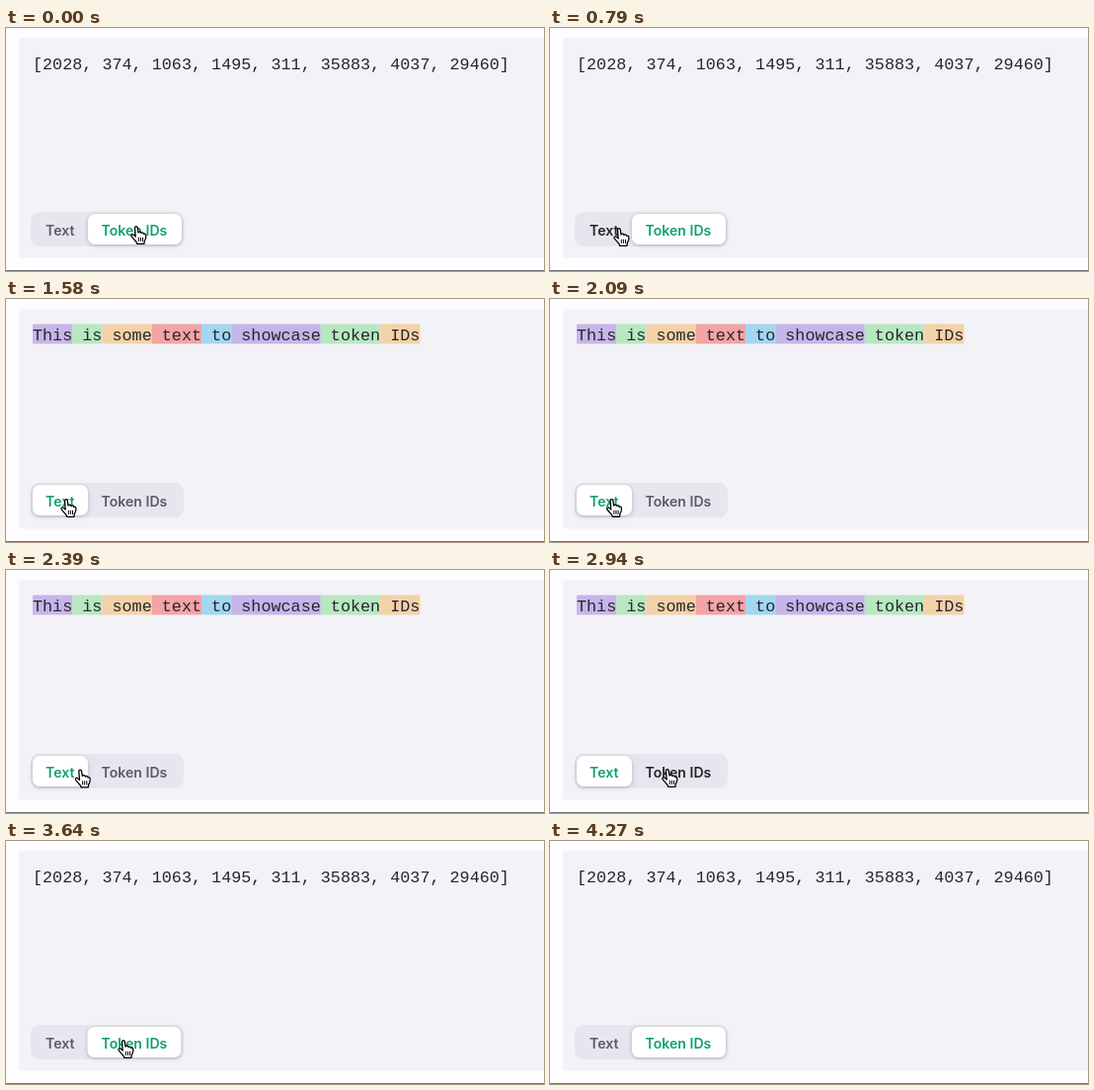
An HTML page that plays this animation: 545x247 px, repeating every 4300 ms.

```html
<!DOCTYPE html>
<html lang="en">
<head>
<meta charset="utf-8">
<style>
html, body { margin: 0; width: 100%; height: 100%; overflow: hidden; background: #fdfcff; }
svg { display: block; }
.mono { font: 16.77px "Liberation Mono", monospace; fill: #26262b; white-space: pre; }
.label { font: 600 14.1px Inter, sans-serif; }
#thumb { fill: #fff; filter: drop-shadow(0 1px 2px #3035504d); }
</style>
</head>
<body>
<svg width="545" height="247" viewBox="0 0 545 247">
  <rect x="13" y="10" width="540" height="223.5" rx="3" fill="#f3f2f6"/>
  <rect y="246" width="545" height="1" fill="#77767a"/>
  <g id="words"></g>
  <text id="ids" class="mono" x="27" y="42">[2028, 374, 1063, 1495, 311, 35883, 4037, 29460]</text>
  <rect x="25" y="187" width="155" height="35" rx="8.5" fill="#e7e6ef"/>
  <rect id="thumb" y="189" height="31" rx="7"/>
  <text id="textTab" class="label" x="40" y="210.5">Text</text>
  <text id="idsTab" class="label" x="96.5" y="210.5">Token IDs</text>
  <g id="hand" fill="#fff" stroke="#000" stroke-width="1.3" stroke-linejoin="round" stroke-linecap="round">
    <path d="M4.5 2.2Q4.5.7 5.8.7Q7.1.7 7.3 2.2L8 7Q8.6 5.9 9.9 6.2Q10.8 6.5 10.9 7.5Q11.6 6.6 12.7 7Q13.5 7.4 13.6 8.4Q14.3 7.8 15.2 8.4Q16 9 15.9 10.5Q15.8 13.5 14.3 15.5L14 18.3H6.8Q6.5 16.8 4.6 14.8L1.2 10.8Q.5 9.6 1.5 9Q2.6 8.6 4 9.8L5.2 11Z"/>
    <path d="M8.3 12.2v3.3M10.4 12.2v3.3M12.5 12.2v3.3" stroke-width="1"/>
  </g>
</svg>
<script>
const $ = id => document.getElementById(id);
const LOOP = 4300, TO_TEXT = 1360, TO_IDS = 3480;
const CHAR = 10.062;
const GREEN = [16, 160, 112], GREY = [91, 90, 108], DARK = [36, 36, 42];

const tints = ['#c5b5ea', '#b7e8c1', '#f3d2a8', '#f4a3a6', '#a2d6f1'];
const words = ['This', ' is', ' some', ' text', ' to', ' showcase', ' token', ' IDs'];
let x = 27, marks = '';
words.forEach((w, i) => {
  const width = w.length * CHAR;
  marks += `<rect x="${x}" y="25.5" width="${width}" height="20" fill="${tints[i % 5]}"/>`;
  x += width;
});
$('words').innerHTML = marks + `<text class="mono" x="27" y="42">${words.join('')}</text>`;

const smooth = p => p * p * (3 - 2 * p);
const easeIn = p => p * p;
const easeOut = p => 1 - (1 - p) ** 3;
const clamp = p => Math.max(0, Math.min(1, p));
const lerp = (a, b, p) => a + (b - a) * p;
const mix = (a, b, p) => `rgb(${a.map((v, i) => lerp(v, b[i], p))})`;

// Cursor stops: start, end, x, y, easing
const moves = [
  [270, 790, 64, 203, smooth],
  [820, 1330, 55, 203, smooth],
  [1940, 2390, 69, 202.5, easeIn],
  [2390, 2790, 113, 202, easeOut],
  [4020, 4265, 4, 250, easeIn],
];

function cursor(t) {
  let cx = 126, cy = 201;
  for (const [start, end, toX, toY, ease] of moves) {
    const p = ease(clamp((t - start) / (end - start)));
    cx = lerp(cx, toX, p);
    cy = lerp(cy, toY, p);
  }
  return [cx, cy];
}

function draw() {
  const t = performance.now() % LOOP;
  const [cx, cy] = cursor(t);
  const showText = t >= TO_TEXT && t < TO_IDS;
  const ease = start => easeOut(clamp((t - start) / 200));
  const p = ease(TO_TEXT) - ease(TO_IDS);
  const over = cy < 217;
  const onText = over && cx + 5 < 83;

  $('words').style.display = showText ? '' : 'none';
  $('ids').style.display = showText ? 'none' : '';
  $('thumb').setAttribute('x', lerp(83, 27, p));
  $('thumb').setAttribute('width', lerp(95, 56, p));
  $('textTab').style.fill = mix(onText ? DARK : GREY, GREEN, p);
  $('idsTab').style.fill = mix(GREEN, over && !onText ? DARK : GREY, p);
  $('hand').setAttribute('transform', `translate(${cx} ${cy})`);
  requestAnimationFrame(draw);
}
draw();
</script>
</body>
</html>
```
